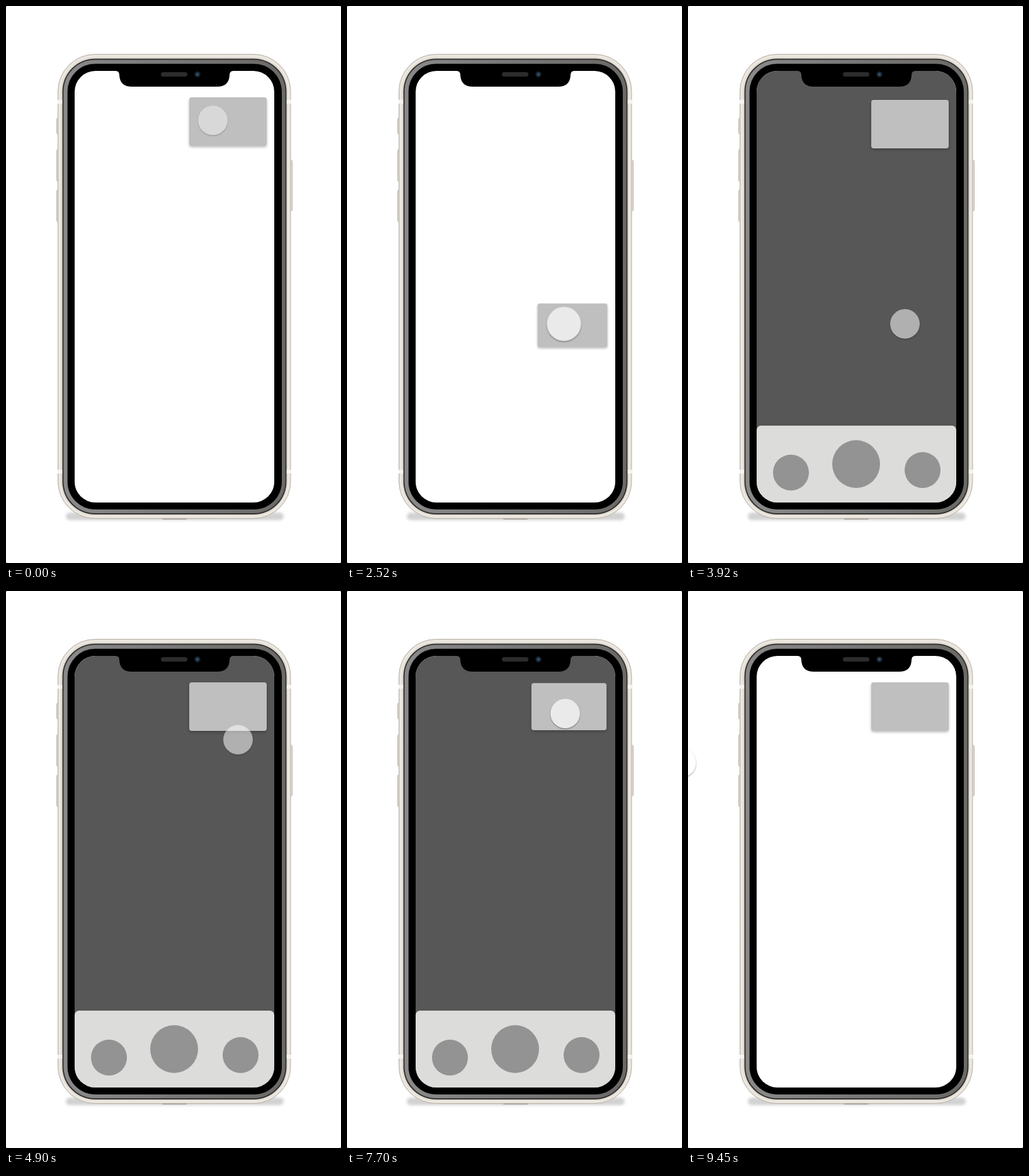
Recreate the animation shown at these times as an HTML page. Size 532x884 px, loop 9.52 s.

```html
<!DOCTYPE html>
<html lang="en">
<head>
<meta charset="utf-8">
<title>Floating card</title>
<style>
  html, body { margin: 0; width: 100%; height: 100%; overflow: hidden; background: #555; }
  .stage { position: relative; width: 532px; height: 884px; overflow: hidden; background: #fff; border-radius: 2px; }
  .stage > *, .screen > * { position: absolute; }
  .phone, .notch { left: 0; top: 0; }
  .screen { left: 109px; top: 103px; width: 317px; height: 685px; border-radius: 33px; overflow: hidden; background: #fff; }
  .dim { inset: 0; background: #575757; }
  .panel { left: 0; top: 563px; width: 317px; height: 124px; border-radius: 7px 7px 0 0; background: #dcdcda; }
  .panel i { position: absolute; width: 57px; height: 57px; border-radius: 50%; background: #939393; }
  .panel .side-l { left: 25.5px; top: 45.5px; }
  .panel .main { left: 120px; top: 22.5px; width: 76px; height: 76px; }
  .panel .side-r { left: 234.5px; top: 41.5px; }
  .card { left: 291px; top: 145px; width: 123px; height: 77px; border-radius: 4px; background: #bfbfbf; box-shadow: 0 2px 4px rgba(0, 0, 0, .28); }
  .cursor { left: 304.5px; top: 157.5px; width: 47px; height: 47px; border-radius: 50%; background: #fff; box-shadow: 0 1px 2px rgba(0, 0, 0, .65); }

  .dim, .panel, .card, .cursor { animation: 9520ms linear infinite; }
  .dim { animation-name: dim; }
  .panel { animation-name: slide; }
  .card { animation-name: card-move, card-press; }
  .cursor { animation-name: cursor-move, cursor-press, cursor-fade; }

  @keyframes dim {
    0%, 35.29% { opacity: 0; }
    36.765% { opacity: .34; animation-timing-function: ease-out; }
    39.71%, 81.3% { opacity: 1; }
    84.56%, 100% { opacity: 0; }
  }
  @keyframes slide {
    0%, 35.29% { translate: 0 124px; }
    36.765% { translate: 0 67.5px; animation-timing-function: ease-out; }
    39.71% { translate: 0 0; }
    81.3% { translate: 0 0; animation-timing-function: ease-out; }
    85.29%, 100% { translate: 0 124px; }
  }
  @keyframes card-move {
    0% { translate: 0 0; }
    4.41% { translate: 0 0; animation-timing-function: ease-in; }
    13.235% { translate: -98.5px 81px; animation-timing-function: ease-out; }
    16.18% { translate: -127px 103px; }
    19.853% { translate: -124.5px 103.5px; animation-timing-function: ease-in; }
    23.53% { translate: -29px 286px; animation-timing-function: ease-out; }
    26.05% { translate: 5.5px 323.5px; }
    26.47% { translate: 5.5px 323.5px; animation-timing-function: ease-out; }
    29.41% { translate: 5.5px 302px; }
    36.76% { translate: 5.5px 302px; animation-timing-function: ease-in-out; }
    41.176% { translate: 0 4px; animation-timing-function: ease-out; }
    42.65%, 100% { translate: 0 0; }
  }
  @keyframes card-press {
    0%, 3.68% { scale: 1; }
    5.88%, 26.47% { scale: .9; }
    28.36%, 33.82% { scale: 1; }
    34.66% { scale: .95; }
    36.03%, 58.82% { scale: 1; }
    61.03%, 66.18% { scale: .9; }
    68.38%, 76.47% { scale: 1; }
    77.94%, 79.41% { scale: .9; }
    80.88% { scale: .97; }
    81.62%, 100% { scale: 1; }
  }
  @keyframes cursor-move {
    0% { translate: 0 0; }
    4.41% { translate: 0 0; animation-timing-function: ease-in; }
    13.235% { translate: -90px 81px; animation-timing-function: ease-out; }
    16.18% { translate: -116px 103px; }
    19.853% { translate: -114px 103px; animation-timing-function: ease-in; }
    23.53% { translate: -18.5px 285.5px; animation-timing-function: ease-out; }
    26.05% { translate: 16px 323px; }
    45.59% { translate: 16px 323px; animation-timing-function: ease-in-out; }
    52.94% { translate: 42px 31px; }
    66.18% { translate: 42px 31px; animation-timing-function: ease-in-out; }
    70.38% { translate: 18px 13px; }
    81.3% { translate: 18px 13px; animation-timing-function: ease-in-out; }
    84.56% { translate: -9px -8px; }
    95.17% { translate: -9px -8px; animation-timing-function: ease-in-out; }
    99.265% { translate: -339px 91px; }
    100% { translate: -360px 97px; }
  }
  @keyframes cursor-press {
    0%, 3.68% { scale: 1; }
    5.88%, 26.47% { scale: 1.16; }
    28.36%, 33.82% { scale: 1; }
    34.66% { scale: 1.1; }
    36.03%, 58.82% { scale: 1; }
    61.03%, 66.18% { scale: 1.24; }
    68.38%, 76.47% { scale: 1; }
    77.94%, 79.41% { scale: 1.2; }
    80.78%, 100% { scale: 1; }
  }
  @keyframes cursor-fade {
    0% { opacity: .39; }
    .735%, 3.68% { opacity: .6; }
    5.88%, 26.47% { opacity: .68; }
    28.36%, 33.82% { opacity: .55; }
    34.66% { opacity: .62; }
    36.03%, 58.82% { opacity: .53; }
    61.03%, 100% { opacity: .68; }
  }
</style>
</head>
<body>
<div class="stage">
  <svg class="phone" width="532" height="884">
    <defs>
      <linearGradient id="rim">
        <stop offset="0" stop-color="#8a8a8a"/>
        <stop offset=".5" stop-color="#777"/>
        <stop offset="1" stop-color="#6c6a67"/>
      </linearGradient>
      <filter id="soft" x="-10%" y="-100%" width="120%" height="300%"><feGaussianBlur stdDeviation="2"/></filter>
    </defs>
    <rect x="95" y="804" width="346" height="12" rx="6" fill="#d2d2d2" filter="url(#soft)"/>
    <g fill="#e3ded6" stroke="#b9b3a9">
      <rect x="80.5" y="178" width="4" height="25" rx="1.5"/>
      <rect x="80.5" y="228" width="4" height="50" rx="1.5"/>
      <rect x="80.5" y="292" width="4" height="50" rx="1.5"/>
      <rect x="450" y="245" width="4.500" height="80" rx="1.5"/>
      <rect x="82.500" y="76.500" width="369.500" height="737" rx="59"/>
    </g>
    <rect x="85.500" y="79.500" width="363.500" height="731" rx="56" fill="none" stroke="#efebe4" stroke-width="2"/>
    <g fill="#f6f4f0">
      <path d="M82 149h8v6h-8zM445 149h8v6h-8zM82 736h8v6h-8zM445 736h8v6h-8z"/>
    </g>
    <rect x="248" y="813" width="39" height="2" rx="1" fill="#a9a49b"/>
    <rect x="89.500" y="83.500" width="356" height="723.500" rx="52" fill="#343331"/>
    <rect x="94.500" y="88.500" width="346" height="713.500" rx="47" fill="none" stroke="url(#rim)" stroke-width="6"/>
    <rect x="98" y="92" width="340" height="707" rx="44"/>
  </svg>
  <div class="screen">
    <div class="dim"></div>
    <div class="panel"><i class="side-l"></i><i class="main"></i><i class="side-r"></i></div>
  </div>
  <svg class="notch" width="532" height="884">
    <path d="M174 102v1q6 0 6 7q1 18 20 18H335q19 0 20-18q0-7 6-7v-1z"/>
    <rect x="246" y="105" width="42" height="7" rx="3.500" fill="#2d2c2c"/>
    <circle cx="304" cy="108.500" r="4.800" fill="#17202c"/>
    <circle cx="304" cy="108.500" r="2.300" fill="#33516f"/>
  </svg>
  <div class="card"></div>
  <div class="cursor"></div>
</div>
</body>
</html>
```
